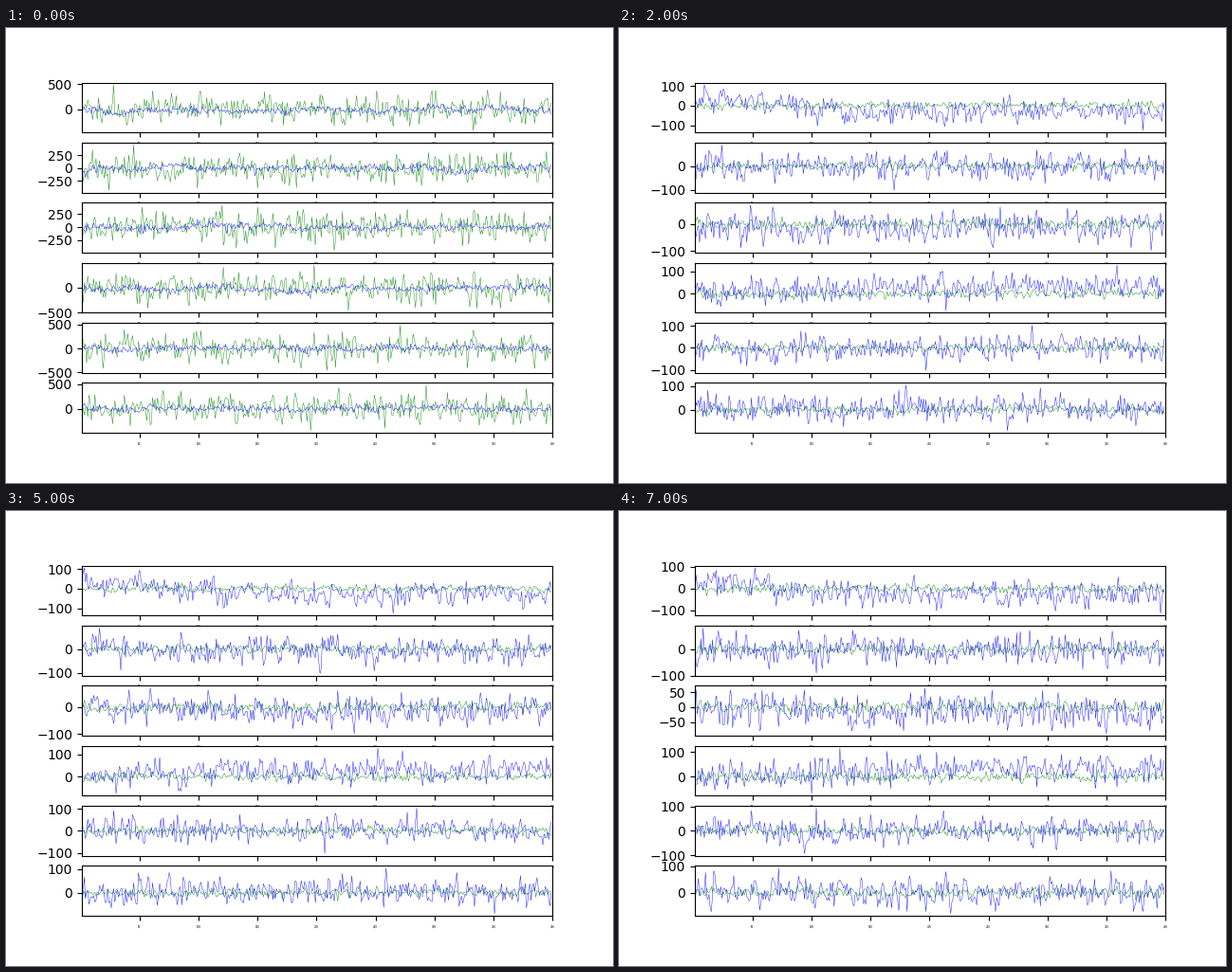
Write a matplotlib script that moves like this. It is 640 px wide and 480 px high and loops after 8 s.

```python
import numpy as np
import matplotlib.pyplot as plt
from matplotlib.animation import FuncAnimation

ROWS, N = 6, 400
X = np.arange(N)

# Typical y limits of each panel, and the levels its blue series moves between
LIMITS = [(-133, 113), (-108, 94), (-103, 77), (-82, 134), (-110, 110), (-94, 109)]
LEVELS = [(24, -28), (-4, -4), (0, -17), (8, 28), (2, 0), (4, 5)]


def limits(second, row):
    if second == 0:
        lo = -490 + 21 * np.cos(2 * np.pi * row / 7)
        hi = 505 + 35 * np.cos(2 * np.pi * (row + 0.6) / 5)
        return lo, hi
    scale = 1 - 0.07 * np.cos(2 * np.pi * (second - 1) / 3)
    return scale * np.array(LIMITS[row])


def drift(row):
    """Smooth step from the first to the second level of a panel."""
    start, end = LEVELS[row]
    return start + (end - start) / (1 + np.exp((85 - X) / 15))


def noise(rng, keep):
    """Unit noise that keeps a share of its previous value."""
    out = rng.standard_normal(N)
    for i in range(1, N):
        out[i] = keep * out[i - 1] + np.sqrt(1 - keep ** 2) * out[i]
    return out


def fit(series, lo, hi):
    """Make the series span the limits less the default 5 % margin."""
    pad = (hi - lo) / 22
    lo, hi = lo + pad, hi - pad
    at_lo, at_hi = series.argmin(), series.argmax()
    series = np.clip(series, 0.9 * lo, 0.9 * hi)
    series[at_lo], series[at_hi] = lo, hi
    return series


def panel_data(second, row):
    rng = np.random.default_rng(100 * second + row + 7)
    lo, hi = limits(second, row)
    if second == 0:
        blue = 28 * noise(rng, 0.93) + 38 * noise(rng, 0)
        green = fit(150 * noise(rng, 0.1), lo, hi)
    else:
        blue = fit(30 * noise(rng, 0.2) + drift(row), lo, hi)
        green = 10 * noise(rng, 0.2)
    return lo, hi, blue, green


fig, axes = plt.subplots(ROWS, 1, figsize=(6.4, 4.8), dpi=100)
lines = []
for ax in axes:
    green, = ax.plot(X, 0 * X, color="g", lw=0.3)
    blue, = ax.plot(X, 0 * X, color="b", lw=0.3)
    lines.append((blue, green))
    ax.set_xlim(1, N)
    ax.set_xticks(range(50, N + 1, 50))
    ax.tick_params(axis="x", labelsize=2)


def update(second):
    for row, (ax, (blue, green)) in enumerate(zip(axes, lines)):
        lo, hi, blue_y, green_y = panel_data(second, row)
        blue.set_ydata(blue_y)
        green.set_ydata(green_y)
        ax.set_ylim(lo, hi)
    return [line for pair in lines for line in pair]


anim = FuncAnimation(fig, update, frames=8, interval=1000, repeat=True,
                     repeat_delay=0, blit=False)
plt.show()
```
